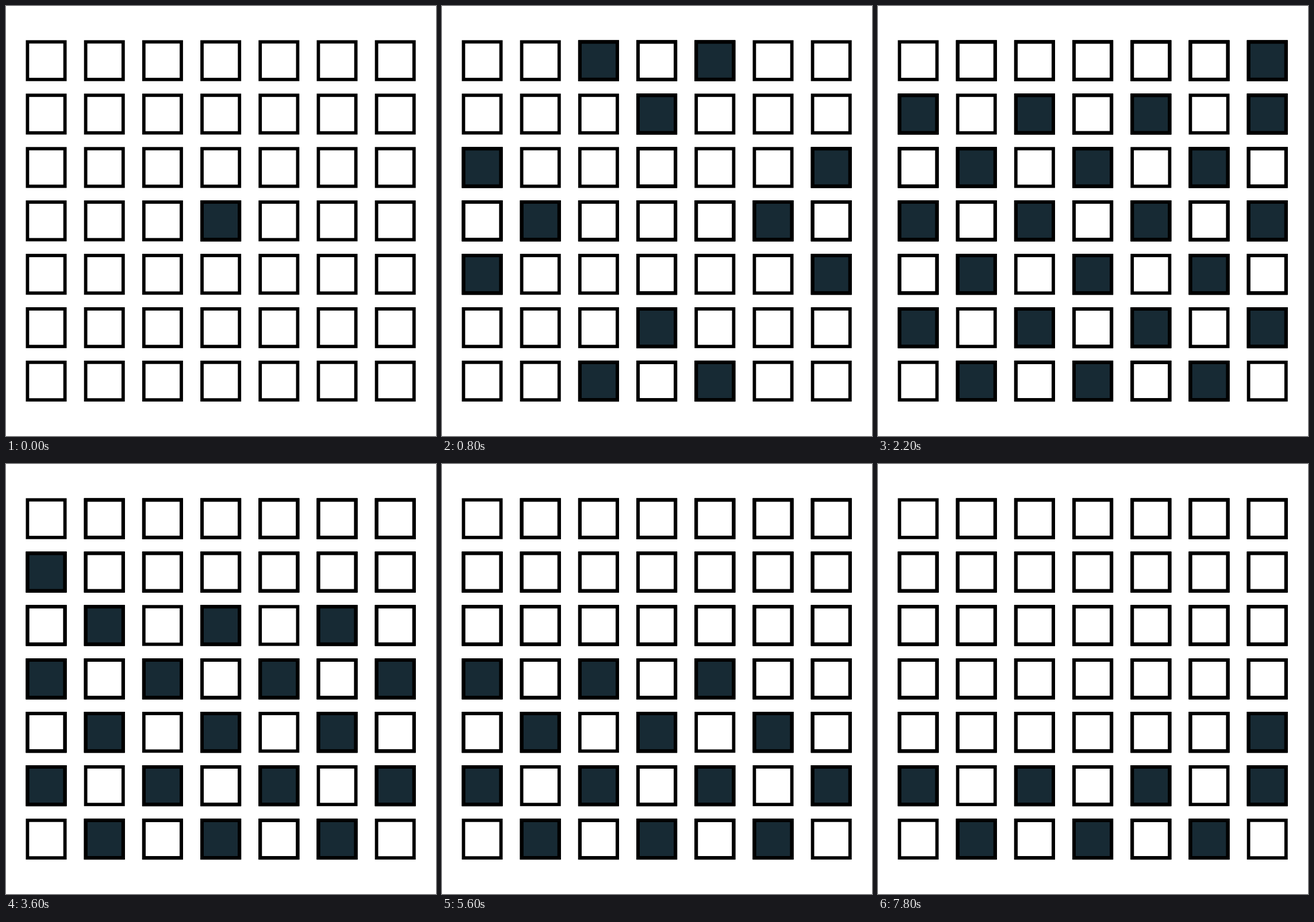
Animation, 748 px wide and 748 px high, one loop 8 s. Source, as an HTML page with a canvas:

```html
<!DOCTYPE html>
<html>
<head>
<meta charset="utf-8">
<style>
  html, body { margin: 0; width: 100%; height: 100%; overflow: hidden; background: #fff; }
  canvas { display: block; }
</style>
</head>
<body>
<canvas id="stage" width="748" height="748"></canvas>
<script>
const ctx = document.getElementById('stage').getContext('2d');
const SIZE = 7, CELLS = SIZE * SIZE, STEP_MS = 200, STEPS = 40, SWEEP_START = 5;

// Position along a path that sweeps right, then left, row by row.
function sweepIndex(row, col) {
  return row * SIZE + (row % 2 ? SIZE - 1 - col : col);
}

function isLit(row, col, step) {
  if (step >= SWEEP_START) {
    const ahead = sweepIndex(row, col) - (step - SWEEP_START);
    return ahead === 0 || (ahead > 0 && (row + col) % 2 === 1);
  }
  // Four beams leave the centre, then split where they meet the walls.
  const dx = Math.abs(col - 3), dy = Math.abs(row - 3);
  const near = Math.min(dx, dy), far = Math.max(dx, dy);
  if (step < 4) return near === 0 && far === step;
  return (near === 0 && far === 2) || (near === 1 && far === 3);
}

function drawCell(row, col, lit, used) {
  const x = 37.4 + col * 101.2, y = 62.4 + row * 92.9;
  ctx.fillStyle = lit ? '#172a34' : '#fff';
  ctx.fillRect(x, y, 65.2, 65.4);
  // Cells that have been lit keep a slightly heavier outline.
  for (let i = 0; i < (used ? 3 : 1); i++) ctx.strokeRect(x, y, 65.2, 65.4);
}

let shownStep = -1, used = new Set();

function drawStep(step) {
  used = new Set();
  ctx.fillStyle = '#fff';
  ctx.fillRect(0, 0, 748, 748);
  ctx.strokeStyle = '#000';
  ctx.lineWidth = 5.8;
  for (let i = 0; i < CELLS; i++) {
    const row = Math.floor(i / SIZE), col = i % SIZE;
    for (let s = 0; s <= step; s++) if (i > 0 && isLit(row, col, s)) used.add(i);
    drawCell(row, col, isLit(row, col, step), used.has(i));
  }
}

const start = performance.now();

function tick() {
  const step = Math.floor((performance.now() - start) / STEP_MS) % STEPS;
  if (step !== shownStep) drawStep(shownStep = step);
  requestAnimationFrame(tick);
}
tick();
</script>
</body>
</html>
```
